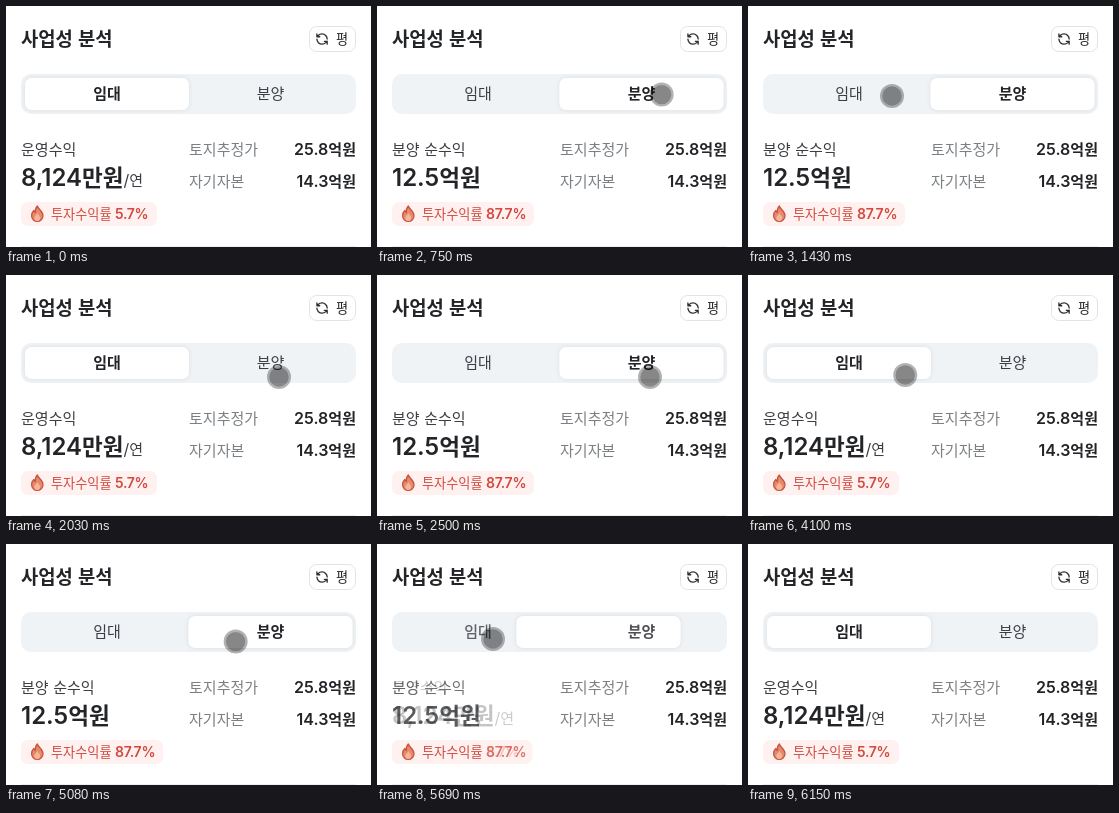
An HTML page for the animation above (7070 ms loop, 365 by 241 pixels).

```html
<!DOCTYPE html>
<html lang="ko">
<head>
<meta charset="utf-8">
<style>
html, body { margin: 0; width: 100%; height: 100%; overflow: hidden; background: #fff; }
svg { display: block; width: 365px; height: 241px; }
text { font-family: Inter, 'Noto Sans CJK KR', 'Noto Sans CJK', sans-serif; font-size: 16px; fill: #3b3e42; }
.ko { font-family: 'Noto Sans CJK KR', 'Noto Sans CJK', sans-serif; font-size: .94em; letter-spacing: 0; }
.b { font-weight: 600; fill: #222427; }
.title { font-size: 20px; }
.big { font-size: 24px; }
.small { font-size: 14px; letter-spacing: -.02em; }
.medium { font-weight: 500; }
.gray { fill: #7c8084; }
.red { fill: #d2493f; }
.mid { text-anchor: middle; }
.end { text-anchor: end; }
</style>
</head>
<body>
<svg viewBox="0 0 365 241">
  <defs>
    <filter id="shadow" x="-10%" y="-30%" width="120%" height="170%">
      <feDropShadow dx="0" dy="0" stdDeviation="2" flood-color="#20303c" flood-opacity=".09"/>
    </filter>
  </defs>
  <rect x="303.5" y="20.5" width="46" height="25" rx="7" fill="#fff" stroke="#e1e4e7"/>
  <path transform="translate(309.2 26.2) scale(.57)" fill="none" stroke="#2b2e31" stroke-width="2.3"
    stroke-linecap="round" stroke-linejoin="round"
    d="M21 12a9 9 0 0 0-9-9 9.75 9.75 0 0 0-6.74 2.74L3 8M3 3v5h5M3 12a9 9 0 0 0 9 9 9.75 9.75 0 0 0 6.74-2.74L21 16M16 16h5v5"/>
  <rect x="15" y="68" width="335" height="40" rx="10" fill="#eff3f6"/>
  <rect id="pill" y="72" width="164" height="32" rx="7" fill="#fff" filter="url(#shadow)"/>
  <rect id="badge" x="15" y="196" height="24" rx="7" fill="#fef1ef"/>
  <path fill="#e58a6c" stroke="#c8553f" stroke-width="1.3" stroke-linejoin="round"
    d="M31.3 200c.6 3 5.700 5 5.700 9.700a5.700 5.700 0 0 1-11.400 0c0-2.500 1-4 2.200-5.200.2 1.100.7 1.700 1.500 2.100-.2-2.500.4-4.900 2-6.600z"/>
  <path fill="#f5b596" d="M31.400 207c.4 1.700 2.800 2.600 2.800 5a3 3 0 0 1-6 0c0-1.900 2.400-2.800 3.200-5z"/>
  <path d="M15 240.500H350" stroke="#eceef0"/>
  <g id="common"></g>
  <g id="rent"></g>
  <g id="sale"></g>
  <g id="cursor">
    <circle r="12" fill-opacity=".3"/>
    <circle r="9.700" fill-opacity=".24"/>
  </g>
</svg>
<script>
const LOOP = 7070, SLIDE = 320;
const $ = id => document.getElementById(id);

// Hangul runs get their own font and optical size.
function label(group, x, y, str, cls = '') {
  const runs = str.replace(/[가-힣]+/g, '<tspan class="ko">$&</tspan>');
  $(group).insertAdjacentHTML('beforeend', `<text x="${x}" y="${y}" class="${cls}">${runs}</text>`);
}

function tabView(group, active, caption, amount, unit, rate) {
  ['임대', '분양'].forEach((name, i) =>
    label(group, 101 + i * 163.5, 93, name, name === active ? 'b mid' : 'mid'));
  label(group, 15, 149, caption);
  label(group, 15, 180, amount, 'b big');
  label(group, 117.5, 180, unit);
  label(group, 109, 213, rate, 'b small red');
}

label('common', 15, 40, '사업성 분석', 'b title');
label('common', 336, 38, '평', 'b small medium mid');
[['토지추정가', '25.8억원'], ['자기자본', '14.3억원']].forEach(([name, value], i) => {
  label('common', 183, 149 + i * 32, name, 'gray');
  label('common', 350, 149 + i * 32, value, 'b end');
});
label('common', 45, 213, '투자수익률', 'small red');
tabView('rent', '임대', '운영수익', '8,124만원', '/연', '5.7%');
tabView('sale', '분양', '분양 순수익', '12.5억원', '', '87.7%');

// Each press flips the tab.
const presses = [340, 1435, 2170, 3450, 4650, 5660];
// Pointer moves: start, duration, then where it stops.
const moves = [
  [70, 150, 290, 82], [640, 270, 277, 98], [980, 450, 144, 90],
  [1735, 295, 273, 102], [2960, 370, 104, 97], [3880, 220, 157, 100],
  [4100, 530, 288, 91], [5010, 140, 173, 104], [5250, 290, 116, 95],
  [5840, 300, 290, 240]
];

const mix = (a, b, k) => a + (b - a) * k;
const progress = (t, from, span) => Math.max(0, Math.min(1, (t - from) / span));
const easeOut = k => 1 - (1 - k) ** 3;

function pointer(t) {
  return moves.reduce(([x, y], [from, span, toX, toY]) => {
    const k = progress(t, from, span);
    return [mix(x, toX, k), mix(y, toY, k)];
  }, [299, 112]);
}

function saleAmount(t) {
  return presses.reduce((v, at, i) =>
    mix(v, 1 - i % 2, easeOut(progress(t, at, SLIDE))), 0);
}

function draw(t) {
  const sale = saleAmount(t);
  $('pill').setAttribute('x', mix(19, 182.5, sale));
  $('badge').setAttribute('width', mix(136, 142, sale));
  $('rent').setAttribute('opacity', 1 - sale);
  $('sale').setAttribute('opacity', sale);
  $('cursor').setAttribute('visibility', t >= 70 && t < 6140 ? 'visible' : 'hidden');
  $('cursor').setAttribute('transform', `translate(${pointer(t)})`);
}

const start = performance.now();
function tick() {
  draw((performance.now() - start) % LOOP);
  requestAnimationFrame(tick);
}
tick();
</script>
</body>
</html>
```
